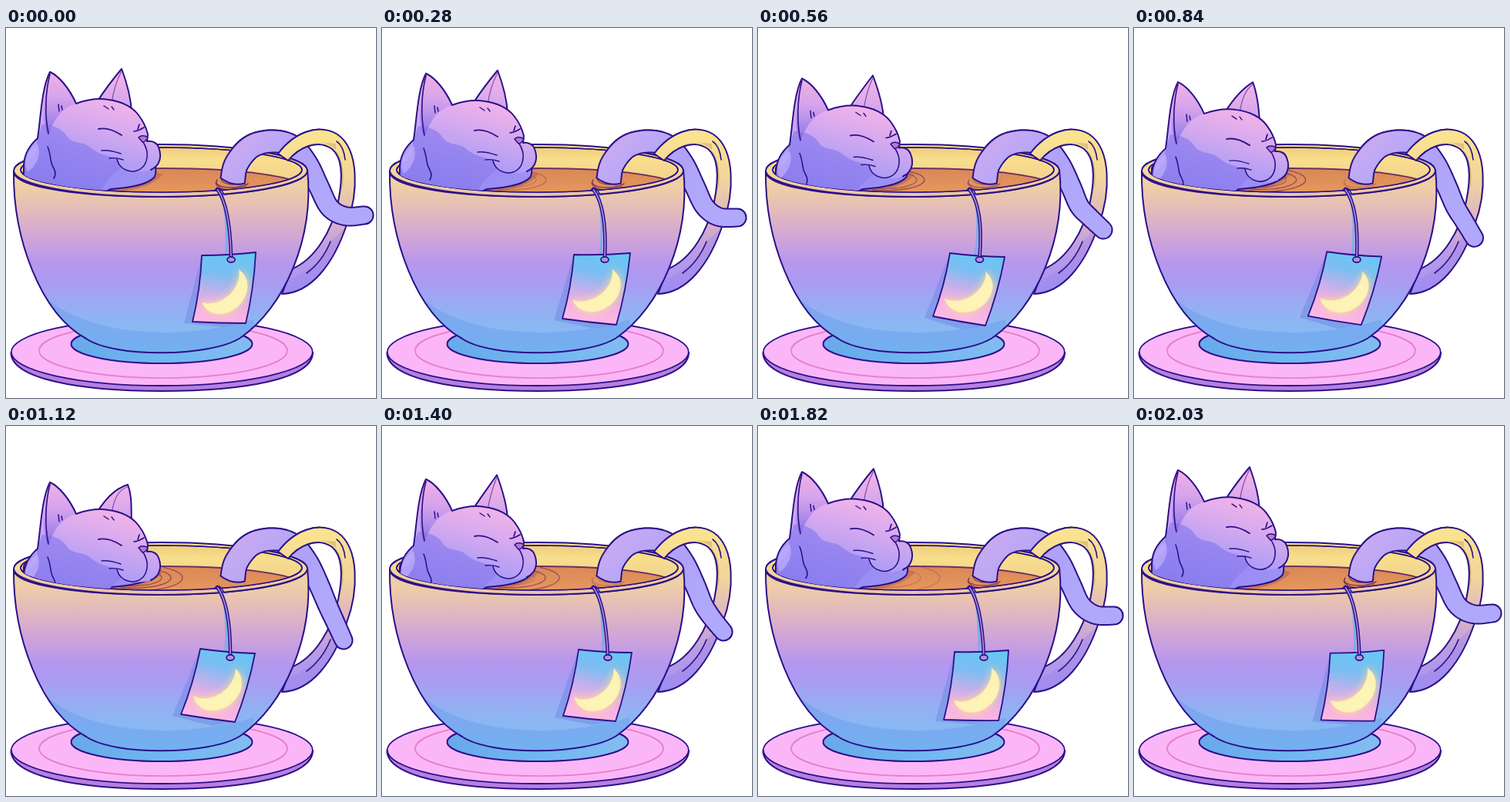
These frames come from a looping animation (480 px wide and 480 px high, 2.1 s). An HTML page with a canvas:

```html
<!DOCTYPE html>
<html lang="en">
<head>
<meta charset="utf-8">
<title>Cat in a teacup</title>
<style>
html, body { margin: 0; width: 100%; height: 100%; overflow: hidden; background: #fff; }
canvas { display: block; width: 480px; height: 480px; }
</style>
</head>
<body>
<canvas id="stage" width="480" height="480"></canvas>
<script>
const ctx = document.getElementById('stage').getContext('2d');
const LOOP = 2100, STEP = 70;
const INK = '#2c1188';

// Key poses, spread over the loop
const times = [0, 280, 560, 1120, 1400, 1820];
const motion = {
  headY: [0, 2, 8.5, 16, 12, 2.5],
  earX: [0, 0, -1, 8, -1, 0],
  earY: [0, 0, 0, 7, -1.5, 0],
  holeX: [292, 289, 287.5, 291, 293, 293],
  tailRipple: [1, .9, .6, .05, .3, .85]
};
const tailBase = [[294, 198], [299, 176], [318, 154], [345, 147], [371, 153], [391, 176], [406, 206]];
const tailEnd = [
  [[420, 233], [419, 232], [417, 231], [417, 232], [417, 232], [419, 232]],
  [[440, 244], [437, 245], [431, 246], [427, 254], [429, 250], [438, 245]],
  [[465, 243], [461, 246], [448, 262], [438, 278], [443, 267], [462, 246]]
];
const tagCorners = {
  tl: [[254, 295], [249, 294], [249, 292], [252, 289], [255, 290], [255, 293]],
  tr: [[324, 291], [322, 292], [320, 297], [323, 295], [324, 294], [325, 291]],
  bl: [[242, 381], [234, 377], [227, 374], [227, 374], [235, 376], [241, 381]],
  br: [[311, 383], [304, 385], [295, 386], [297, 384], [303, 383], [312, 382]]
};
const ripples = [
  { x: [203, 213, 216, 229, 230, 236], a: [0, .5, .9, .9, .8, .35] },
  { x: [198, 200, 206, 214, 212, 211], a: [0, .3, .7, .9, .8, .3] },
  { x: [190, 190, 192, 202, 198, 192], a: [0, 0, .2, .9, .3, 0] }
];

// Smooth periodic curve through the key poses
function at(vals, t) {
  const n = times.length;
  const T = i => times[(i + n) % n] + Math.floor(i / n) * LOOP;
  const V = i => vals[(i + n) % n];
  let i = n - 1;
  while (times[i] > t) i--;
  const h = T(i + 1) - T(i), u = (t - T(i)) / h;
  const slope = k => (V(k + 1) - V(k - 1)) / (T(k + 1) - T(k - 1)) * h;
  const u2 = u * u, u3 = u2 * u;
  return (2 * u3 - 3 * u2 + 1) * V(i) + (u3 - 2 * u2 + u) * slope(i)
    + (3 * u2 - 2 * u3) * V(i + 1) + (u3 - u2) * slope(i + 1);
}
const pointAt = (pts, t) => [at(pts.map(p => p[0]), t), at(pts.map(p => p[1]), t)];
const alphaAt = (vals, t) => Math.max(0, Math.min(1, at(vals, t)));

function grad(x0, y0, x1, y1, ...stops) {
  const g = ctx.createLinearGradient(x0, y0, x1, y1);
  for (const [pos, color] of stops) g.addColorStop(pos, color);
  return g;
}
function ellipse(x, y, rx, ry) {
  const p = new Path2D();
  p.ellipse(x, y, rx, ry, 0, 0, Math.PI * 2);
  return p;
}
function paint(path, fill, stroke = INK, width = 2) {
  if (typeof path === 'string') path = new Path2D(path);
  if (fill) { ctx.fillStyle = fill; ctx.fill(path); }
  if (stroke) { ctx.strokeStyle = stroke; ctx.lineWidth = width; ctx.stroke(path); }
}
const line = (d, color = INK, width = 1.6) => paint(d, null, color, width);
function clipped(path, draw) {
  ctx.save();
  ctx.clip(path);
  draw();
  ctx.restore();
}
function rect(x, y, w, h) {
  const p = new Path2D();
  p.rect(x, y, w, h);
  return p;
}

const rimOuter = ellipse(200.5, 185, 190.5, 34);
const rimInner = ellipse(201.5, 184, 182.5, 29);
const tea = ellipse(205, 207, 180, 25);
const bowl = new Path2D('M10 186 C9 272 44 370 104 403 C140 428 265 427 304 402 C362 362 400 272 391 184 C390 230 10 230 10 186 Z');
const handle = new Path2D('M353 163 C373 136 405 123 430 138 C459 158 457 215 442 255 C425 306 396 344 358 345 L370 313 C402 300 423 262 431 225 C438 190 436 168 423 157 C403 143 379 156 366 172 Z');
const aboveRim = new Path2D('M0 0 H480 V184 H384 A182.5 29 0 0 1 19 184 H0 Z');

function drawSaucer() {
  paint('M6.5 421 C6.5 455 95 471 202 471 C310 471 398 455 398 421 Z', '#b87fdf');
  paint(ellipse(202.3, 420.5, 195.5, 43.5), '#fbb6f8', INK, 1.8);
  paint(ellipse(204, 418.5, 161, 35.5), null, '#e37fc6', 1.6);
}

function drawHandle() {
  paint(handle, grad(0, 131, 0, 345, [0, '#fbe58d'], [.3, '#f3d59b'], [.55, '#dcb4c4'], [.75, '#b99be6'], [1, '#a795f2']), null);
  clipped(handle, () => {
    paint('M404 148 C430 149 441 172 437 205 L428 230 V150 Z', 'rgba(206,166,104,.5)', null);
    paint('M370 325 C397 314 414 294 421 277 L450 250 V350 H350 Z', 'rgba(128,108,230,.22)', null);
  });
  paint(handle, null);
  line('M429 147 C436 152 439 162 440 171');
  line('M421 277 C414 294 404 308 390 318');
}

function drawBowl() {
  paint(ellipse(202, 410, 117.5, 25), grad(85, 0, 320, 0, [0, '#67a9ea'], [.5, '#70b7ef'], [1, '#83bdf2']));
  paint(bowl, grad(0, 205, 0, 422, [0, '#efcfa5'], [.16, '#e2b9bd'], [.32, '#cfa4d9'], [.47, '#b596ee'],
    [.6, '#a79ef2'], [.78, '#8fb4f2'], [1, '#7fc0f2']), null);
  clipped(bowl, () => {
    paint('M44 342 C92 396 215 410 322 378 L310 440 H60 Z', 'rgba(92,146,236,.36)', null);
  });
  paint(bowl, null);
  paint(rimOuter, grad(0, 151, 0, 219, [0, '#fbe389'], [.5, '#f4d898'], [1, '#e9c3a8']));
  paint(rimInner, grad(0, 157, 0, 195, [0, '#efcf7e'], [.35, '#f8de8b'], [1, '#f3d391']), INK, 1.6);
}

function drawTea(t) {
  clipped(rimInner, () => {
    paint(tea, grad(0, 182, 0, 213, [0, '#d98856'], [1, '#e6975e']), '#6f2f62', 1.8);
    clipped(tea, () => {
      paint('M125 214 C165 212 190 206 203 190 L190 185 L120 200 Z', 'rgba(176,92,82,.5)', null);
      for (const r of ripples) {
        const x = at(r.x, t);
        ctx.globalAlpha = alphaAt(r.a, t);
        const p = new Path2D();
        p.ellipse(165, 197, x - 165, (x - 165) * .25 + 1, 0, -.9, 1.9);
        paint(p, null, '#8f4656', 1.4);
      }
      ctx.globalAlpha = alphaAt(motion.tailRipple, t);
      line('M274 197 C266 207 300 211 314 202', '#7a3455', 1.5);
      line('M272 201 C276 213 306 211 311 206', '#7a3455', 1.3);
      line('M281 194 C274 201 296 207 309 199', '#7a3455', 1.3);
      ctx.globalAlpha = 1;
    });
  });
  paint(rimInner, null, INK, 1.6);
}

function tailPath(t) {
  const pts = [...tailBase, ...tailEnd.map(k => pointAt(k, t))];
  const n = pts.length - 1, per = 10, left = [], right = [];
  const P = i => pts[Math.max(0, Math.min(n, i))];
  let tip, heading;
  for (let k = 0; k <= n * per; k++) {
    const i = Math.min(n - 1, Math.floor(k / per)), u = k / per - i;
    const spline = c => {
      const [a, b, d, e] = [P(i - 1)[c], P(i)[c], P(i + 1)[c], P(i + 2)[c]];
      return [b + .5 * u * (d - a + u * (2 * a - 5 * b + 4 * d - e + u * (3 * (b - d) + e - a))),
        .5 * (d - a) + u * (2 * a - 5 * b + 4 * d - e) + 1.5 * u * u * (3 * (b - d) + e - a)];
    };
    const [x, dx] = spline(0), [y, dy] = spline(1), len = Math.hypot(dx, dy) || 1;
    const w = 16 - 4.5 * k / (n * per);
    left.push([x + dy / len * w, y - dx / len * w]);
    right.push([x - dy / len * w, y + dx / len * w]);
    tip = [x, y, w];
    heading = Math.atan2(dy, dx);
  }
  const p = new Path2D();
  left.forEach(q => p.lineTo(...q));
  p.arc(...tip, heading - Math.PI / 2, heading + Math.PI / 2);
  right.reverse().forEach(q => p.lineTo(...q));
  p.quadraticCurveTo(294, 206, ...left[0]);
  return p;
}
function drawTail(path) {
  paint(path, grad(305, 135, 400, 235, [0, '#cdaaf0'], [.25, '#bda8f5'], [.6, '#aea2f8'], [1, '#b0a9fb']));
}

function drawCat(t) {
  const y = at(motion.headY, t);
  const ex = 150 + at(motion.earX, t), ey = 53 + at(motion.earY, t);
  const fur = grad(122, 88, 92, 205, [0, '#f2b4e8'], [.3, '#d9aaee'], [.6, '#b7a0f4'], [1, '#9c91f4']);
  const outline = 'M23 225 V178 C24 163 30 153 41 143 C45 118 46 78 57 57 C70 63 83 80 91 98 C108 92 121 91 133 93 C149 95 164 102 172 113 C178 121 182 129 184 138 L183 147 C190 146 196 149 198 155 C202 165 201 178 188 184';
  clipped(aboveRim, () => {
    // Body stays at the waterline
    paint('M23 225 V182 C30 165 60 160 100 165 H192 C195 180 195 190 192 194 C183 203 165 207 136 209 L100 225 Z',
      grad(30, 170, 190, 205, [0, '#a69af6'], [.5, '#998cf3'], [1, '#9e91f5']));
    ctx.save();
    ctx.translate(0, y);
    const ear = new Path2D(`M118 96 C127 82 139 66 ${ex} ${ey} C${ex + 6} ${ey + 16} 162 90 163 109 Z`);
    paint(ear, grad(140, 55, 145, 105, [0, '#f3b7e3'], [.6, '#e0abe9'], [1, '#cda3ed']));
    line(`M137 99 C139 82 144 67 ${ex} ${ey + 3}`, 'rgba(96,50,170,.75)', 1.3);
    const head = new Path2D(outline + ' C176 188 160 187 150 181 C140 190 125 198 120 225 Z');
    paint(head, fur, null);
    clipped(head, () => {
      paint('M18 176 C34 173 42 160 40 146 L47 125 C60 126 71 129 78 139 C85 151 98 147 107 153 C117 162 128 166 142 168 C145 176 153 184 163 186 L165 225 H18 Z',
        'rgba(122,108,236,.5)', null);
      paint('M25 178 C26 162 33 155 41 151 C46 164 40 178 28 187 Z', 'rgba(190,172,252,.75)', null);
      paint('M57 57 C70 63 83 80 91 98 C75 103 64 114 55 139 C47 125 46 85 57 57 Z',
        grad(60, 57, 58, 138, [0, 'rgba(243,178,226,.9)'], [.4, 'rgba(204,156,238,.6)'], [1, 'rgba(118,100,226,.75)']), null);
    });
    // Open under the jaw
    line(outline, INK, 2);
    line('M57 60 C51 83 50 113 55 137');
    line('M54 154 C58 163 57 171 60 178 C63 184 66 189 62 195');
    line('M68 99 L69 108 M72 101 L73 106', INK, 1.5);
    line('M127 101 L133 105 M137 102 L140 106', INK, 1.4);
    line('M120 131 C129 129 139 132 150 139', INK, 1.9);
    line('M166 134 C170 134 174 132 179 129 M171 131 L173 125', INK, 1.7);
    paint('M172 142 C175 139 180 139 184 142 C182 146 180 148 177 148 Z', '#b27ad6', INK, 1.5);
    line('M178 148 C181 153 184 160 183 167 C182 179 174 186 163 186 C153 185 146 179 144 170');
    line('M124 159 C132 158 140 160 149 163 M134 169 C140 168 146 169 152 171', INK, 1.4);
    ctx.restore();
  });
}

function drawTag(t) {
  const { tl, tr, bl, br } = Object.fromEntries(
    Object.entries(tagCorners).map(([k, v]) => [k, pointAt(v, t)]));
  const hx = at(motion.holeX, t), hy = 300.5;
  const mid = (a, b, dx, dy) => [(a[0] + b[0]) / 2 + dx, (a[1] + b[1]) / 2 + dy];
  const card = new Path2D(`M${tl} Q${mid(tl, tr, 0, 2)} ${tr} Q${mid(tr, br, 4, 2)} ${br}
    Q${mid(bl, br, 0, 1)} ${bl} Q${mid(tl, bl, 4, 2)} ${tl} Z`);

  // Shadows on the cup
  line(`M281 217 C285 238 287 265 ${hx - 6} 296`, 'rgba(112,174,240,.85)', 3);
  paint(`M${tl} L${bl[0] - 11} ${bl[1] + 2} L${br[0] - 30} ${br[1] + 5} L${br} Z`, 'rgba(106,132,224,.45)', null);

  paint(card, grad(tl[0] + 35, tl[1], bl[0] + 35, bl[1] + 4, [0, '#69c6f3'], [.28, '#7cbdf2'], [.55, '#c4b0ec'], [.78, '#f4b1e3'], [1, '#fcb8e6']), null);
  clipped(card, () => {
    ctx.transform((tr[0] - tl[0]) / 70, (tr[1] - tl[1]) / 70, (bl[0] - tl[0]) / 85, (bl[1] - tl[1]) / 85, ...tl);
    ctx.shadowColor = '#ffdca0';
    ctx.shadowBlur = 12;
    paint('M52 22 A30 30 0 1 1 9 61 A33 33 0 0 0 52 22 Z', '#fdf5b8', '#f9e6a4', .8);
  });
  paint(card, null, INK, 1.8);

  const cord = `M274 209 C286 225 291 256 ${hx} ${hy - 3}`;
  line(cord, INK, 4.6);
  line(cord, '#b193dd', 1.6);
  line('M271 210 C276 206 280 209 282 215', INK, 1.6);
  paint(ellipse(hx, hy, 5, 3.6), '#b193dd', INK, 1.7);
}

function draw(t) {
  ctx.fillStyle = '#fff';
  ctx.fillRect(0, 0, 480, 480);
  ctx.lineJoin = ctx.lineCap = 'round';
  const tail = tailPath(t);
  drawSaucer();
  drawHandle();
  drawTail(tail);
  drawBowl();
  drawTea(t);
  clipped(rect(270, 120, 95, 90), () => drawTail(tail));
  clipped(rect(345, 120, 62, 53), drawHandle);
  drawCat(t);
  drawTag(t);
}

const start = performance.now();
function tick() {
  const t = (performance.now() - start) % LOOP;
  draw(Math.floor(t / STEP) * STEP);
  requestAnimationFrame(tick);
}
tick();
</script>
</body>
</html>
```
